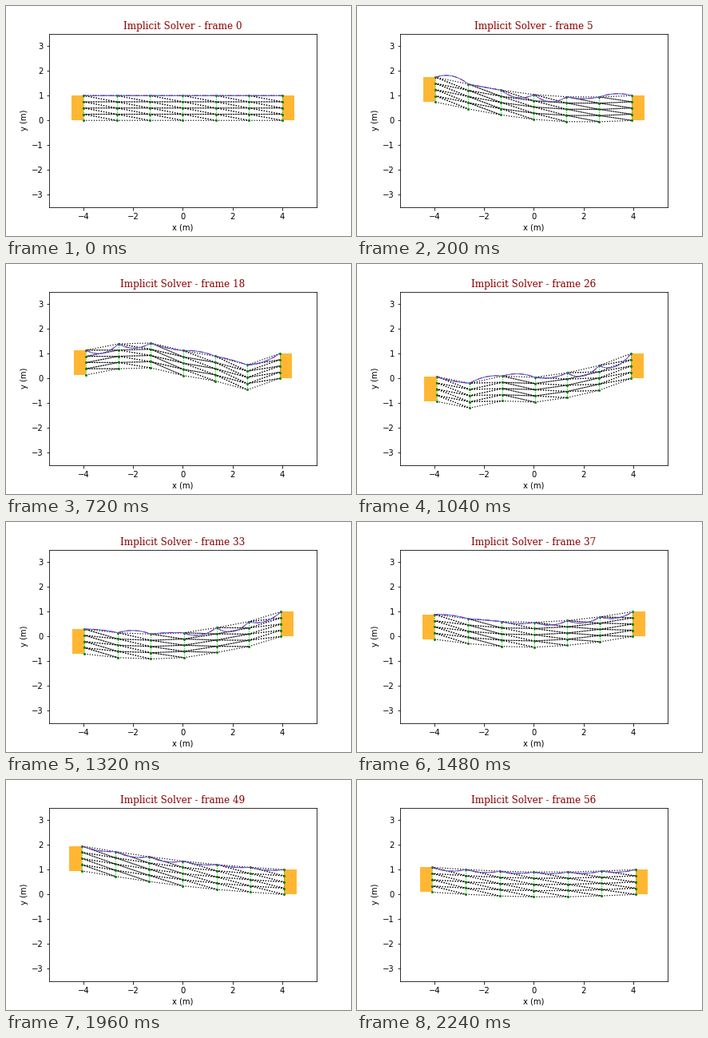
A matplotlib script for the animation above (2280 ms loop, 432 by 288 pixels).

```python
import numpy as np
import matplotlib.pyplot as plt
from matplotlib.animation import FuncAnimation
from matplotlib.patches import Rectangle

FRAMES, INTERVAL = 57, 40
COLS, ROWS = 7, 5
S = np.linspace(0, 1, COLS)
MID = (S[1:] + S[:-1]) / 2
LEVELS = np.linspace(0, 1, ROWS)

# Key points of the main sag of the mesh.
KEYS = np.array([0, 10, 18, 26, 33, 42, 56])
SAG = np.array([0, -.495, .034, -.505, -.504, -.188, -.143])
SLOPES = np.gradient(SAG, KEYS)


def sag(t):
    """Cubic Hermite curve through the key points."""
    k = min(np.searchsorted(KEYS, t, side="right") - 1, len(KEYS) - 2)
    h = KEYS[k + 1] - KEYS[k]
    u = (t - KEYS[k]) / h
    return ((1 + 2 * u) * (1 - u) ** 2 * SAG[k]
            + u * (1 - u) ** 2 * h * SLOPES[k]
            + u * u * (3 - 2 * u) * SAG[k + 1]
            + u * u * (u - 1) * h * SLOPES[k + 1])


def pulse(t, center, width):
    return np.exp(-((t - center) / width) ** 2)


def mode(n):
    return np.sin(n * np.pi * S)


def pose(t):
    """Node x positions and bottom edge heights."""
    half = 4 - 0.1 * np.sin(t / 12)
    x = half * (2 * S - 1) + 0.05 * pulse(t, 29, 9) * mode(1)
    ripple = -(0.11 * mode(3) + 0.09 * mode(5)
               + 0.1 * np.sin(np.pi * (t - 22) / 8) * mode(4))
    y = ((1 - S) * np.sin(t / 6)
         + sag(t) * mode(1)
         + 0.4 * pulse(t, 16, 6) * mode(2)
         + pulse(t, 22, 8) * ripple)
    return x, y


def bulge(t):
    """Height of the surface above each chord, damped over time."""
    amps = [-0.08,
            -0.09 - 0.55 * sag(t),
            -0.6 * np.exp(-t / 15) * np.sin((t - 14) / 6),
            -0.12 * pulse(t, 30, 16) * np.sin(np.pi * (t - 21.5) / 16)]
    waves = [a * np.cos(n * np.pi * MID) for n, a in enumerate(amps)]
    return min(t / 10, 1) * np.sum(waves, axis=0)


def surface(x, top, heights):
    s = np.linspace(0, 1, 21)
    xs = [a + (b - a) * s for a, b in zip(x, x[1:])]
    ys = [a + (b - a) * s + 4 * c * s * (1 - s)
          for a, b, c in zip(top, top[1:], heights)]
    return np.concatenate(xs), np.concatenate(ys)


fig = plt.figure(figsize=(6, 4), dpi=72)
fig.subplots_adjust(left=0.125, right=0.9, bottom=0.125, top=0.88)
ax = fig.add_subplot()
half_width = 3.5 * (0.775 * 6) / (0.755 * 4)
ax.set(xlim=(-half_width, half_width), ylim=(-3.5, 3.5),
       xlabel="x (m)", ylabel="y (m)")
title = ax.set_title("", family="DejaVu Serif", color="darkred", size=12)

walls = [ax.add_patch(Rectangle((0, 0), 0.5, 1, color="orange", alpha=0.8, lw=0))
         for _ in range(2)]

triangles = []
for i in range(COLS - 1):
    for j in range(ROWS - 1):
        a, b = (i, j), (i + 1, j)
        c, d = (i, j + 1), (i + 1, j + 1)
        triangles += [(a, b, c), (d, c, b)]
edges = [ax.plot([], [], "k:", lw=1.2)[0] for _ in triangles]
columns = [ax.plot([], [], "g.:", lw=0.9, ms=4)[0] for _ in range(COLS)]
solid, = ax.plot([], [], "c-", lw=1)
dashed, = ax.plot([], [], "m-.", lw=1)


def draw(t):
    x, y = pose(t)
    title.set_text(f"Implicit Solver - frame {t}")
    walls[0].set_xy((x[0] - 0.5, y[0]))
    walls[1].set_xy((x[-1], y[-1]))
    for line, tri in zip(edges, triangles):
        line.set_data([x[i] for i, _ in tri],
                      [y[i] + LEVELS[j] for i, j in tri])
    for line, xc, yc in zip(columns, x, y):
        line.set_data(np.full(ROWS, xc), yc + LEVELS)
    curve = surface(x, y + 1, bulge(t))
    solid.set_data(*curve)
    dashed.set_data(*curve)
    return [title, *walls, *edges, *columns, solid, dashed]


anim = FuncAnimation(fig, draw, frames=FRAMES, interval=INTERVAL,
                     repeat=True, repeat_delay=0, blit=False)
plt.show()
```
